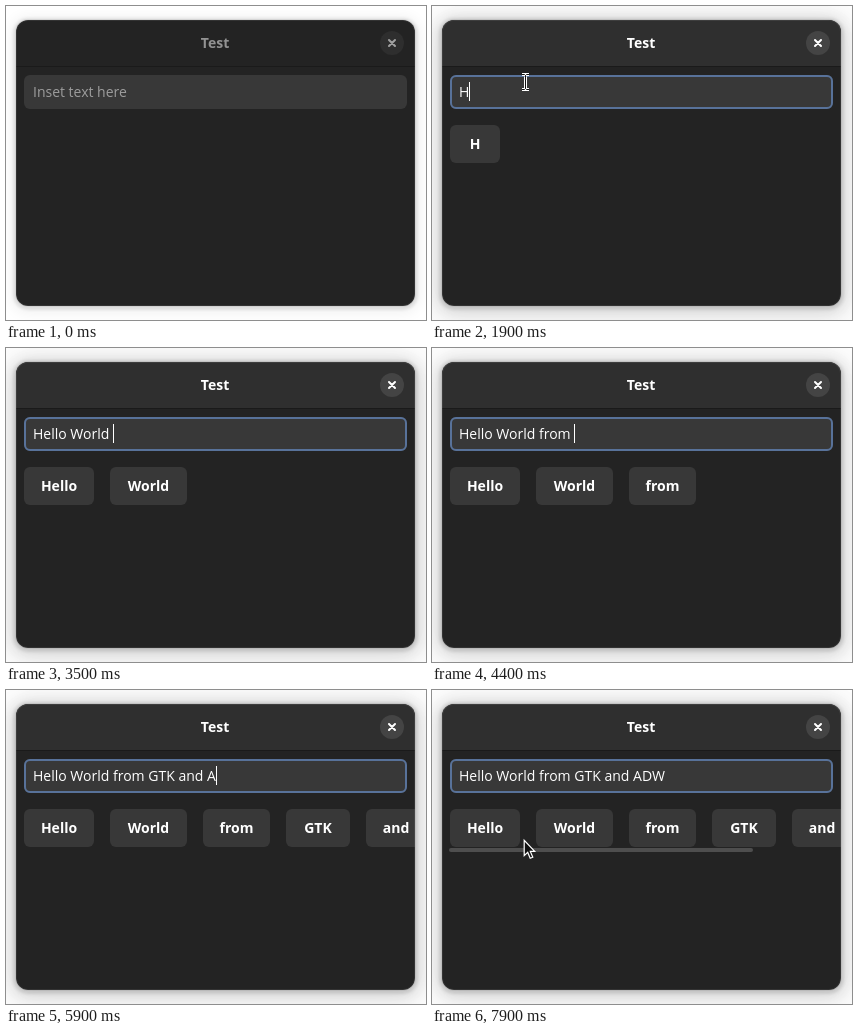
Animation, 420 px wide and 314 px high, one loop 8000 ms. Source, as an HTML page:

```html
<!DOCTYPE html>
<html lang="en">
<head>
<meta charset="utf-8">
<title>Test</title>
<style>
  html, body { margin: 0; width: 100%; height: 100%; overflow: hidden; background: #fff; }
  body { position: relative; font: 14px "Open Sans", "Noto Sans", sans-serif; color: #fff; }
  #stage { position: absolute; left: 0; top: 0; width: 420px; height: 314px; overflow: hidden; }
  #stage * { box-sizing: border-box; }
  #shade, #win, #edge, #head, #title, #close, #entry, #hint, #typed, #ring, #caret, #chips, #bar, #beam, #arrow {
    position: absolute; left: 0; top: 0;
  }
  #shade, #win, #edge { left: 10px; top: 14px; width: 399px; height: 286px; border-radius: 12px; }
  #shade {
    box-shadow: 0 1px 3px 3px rgba(0,0,0,.09), 0 2px 14px 5px rgba(0,0,0,.06),
      0 0 0 1px rgba(0,0,0,.05);
  }
  .active #shade {
    box-shadow: 0 1px 3px 3px rgba(0,0,0,.1), 0 2px 14px 5px rgba(0,0,0,.09),
      0 4px 28px 12px rgba(0,0,0,.05), 0 6px 40px 16px rgba(0,0,0,.03), 0 0 0 1px rgba(0,0,0,.05);
  }
  #win { background: #232323; overflow: hidden; }
  #edge { box-shadow: inset 0 0 0 1px rgba(255,255,255,.07); }
  #head { width: 399px; height: 46px; box-shadow: 0 1px rgba(0,0,0,.25); }
  .active #head { background: #2f2f2f; }
  #title { width: 398px; line-height: 46px; text-align: center; font-weight: 700; color: #929292; }
  #close { left: 364px; top: 11px; width: 24px; height: 24px; border-radius: 50%; background: #2e2e2e; }
  #close path { stroke: #a0a0a0; stroke-width: 2; stroke-linecap: round; }
  .active #title { color: #fff; }
  .active #close { background: #444; }
  .active #close path { stroke: #fff; }
  #entry { left: 8px; top: 55px; width: 383px; height: 34px; border-radius: 6px; background: #383838; line-height: 34px; }
  #hint, #typed { left: 9px; white-space: pre; }
  #hint { color: #9d9d9d; }
  #ring { border: 2px solid #58729a; border-radius: 6px; }
  #caret { top: 7px; width: 1px; height: 19px; background: #fff; }
  #chips { left: 8px; top: 105px; display: flex; gap: 16px; }
  .chip {
    flex: none; height: 38px; min-width: 50px; padding: 0 17px; border-radius: 6px; background: #383838;
    font-weight: 700; line-height: 38px; display: flex; justify-content: center;
  }
  #bar { left: 7px; top: 144px; width: 304px; height: 4px; border-radius: 2px; background: #4e4e4e; }
  #beam, #arrow { overflow: visible; }
  #beam path { fill: none; stroke: #111; }
  #beam path:first-child { stroke: #fff; stroke-width: 3; }
</style>
</head>
<body>
<div id="stage">
  <div id="shade"></div>
  <div id="win">
    <div id="head">
      <div id="title">Test</div>
      <div id="close"><svg width="24" height="24"><path d="M9 9l6 6M15 9l-6 6"/></svg></div>
    </div>
    <div id="entry">
      <span id="hint">Inset text here</span><span id="typed"></span>
      <div id="ring"></div><div id="caret"></div>
    </div>
    <div id="chips"></div>
    <div id="bar"></div>
  </div>
  <div id="edge"></div>
  <svg id="beam" width="10" height="18"></svg>
  <svg id="arrow" width="12" height="20">
    <path d="M.7.8V16.2L4.2 12.9L6.7 18.8L9.3 17.7L6.8 11.9H11.2Z" fill="#111" stroke="#fff" stroke-width="1.2"/>
  </svg>
</div>
<script>
const LOOP = 8000, TICK = 100, FOCUS = 900, TYPE = 1900;
const $ = id => document.getElementById(id);

// bursts of typing, one key per tick
const bursts = [
  [TYPE, 'H'], [2100, 'ello '], [2800, 'Wor'], [3300, 'ld fro'], [4100, 'm '],
  [4600, 'GTK '], [5100, 'and '], [5900, 'A'], [6100, 'DW']
];
const keys = bursts.flatMap(([at, text]) => [...text].map((char, i) => ({ char, at: at + i * TICK })));
const words = keys.map(k => k.char).join('').split(' ');
const widths = [70, 77, 67, 64, 60, 68];

const chips = words.map(() => {
  const chip = document.createElement('div');
  chip.className = 'chip';
  return $('chips').appendChild(chip);
});

const beamShape = '<path d="M-3.5-7.5H-1L0-6.5L1-7.5H3.5M0-6.5V6.5M-3.5 7.5H-1L0 6.5L1 7.5H3.5"/>';
$('beam').innerHTML = beamShape + beamShape;

const ramp = (t, a, b) => Math.min(1, Math.max(0, (t - a) / (b - a)));
const mix = (a, b, k) => a + (b - a) * k;
const easeOut = k => 1 - (1 - k) ** 2;
const show = (el, on) => { el.style.display = on ? '' : 'none'; };

// steady after a key, then a soft blink
function caretAlpha(t, lastKey) {
  if (t < FOCUS) return 0;
  const since = t - lastKey - 200;
  if (since < 0) return 1;
  const phase = since % 1200;
  return phase < 500 ? 1 - ramp(phase, 0, 300) : ramp(phase, 500, 800);
}

function drawText(t) {
  const done = keys.filter(k => k.at <= t);
  const text = done.map(k => k.char).join('');
  const parts = text.split(' ');
  $('typed').textContent = text;
  show($('hint'), !text);
  chips.forEach((chip, i) => {
    const part = parts[i] || '';
    chip.textContent = part;
    chip.style.width = part === words[i] ? widths[i] + 'px' : '';
    show(chip, part);
  });
  const caret = $('caret').style;
  caret.left = 9 + Math.round($('typed').getBoundingClientRect().width) + 'px';
  caret.opacity = caretAlpha(t, text ? done[done.length - 1].at : FOCUS);
}

function drawRing(t) {
  const k = easeOut(ramp(t, FOCUS, 1200));
  const ring = $('ring').style;
  ring.inset = mix(-4, 0, k) + 'px';
  ring.opacity = k;
}

function pointer(t) {
  if (t >= 400 && t < 2100) {
    const k = easeOut(ramp(t, 400, 700));
    return { x: mix(1, 93.5, k), y: mix(95, 76, k), beam: t >= 500 };
  }
  if (t >= 6900) {
    const k = ramp(t, 6900, 7800), y = mix(86, 149.5, k * k * (3 - 2 * k));
    return { x: mix(94, 91.5, k), y, beam: y < 103 };
  }
  return null;
}

function drawPointer(t) {
  const p = pointer(t);
  show($('beam'), p && p.beam);
  show($('arrow'), p && !p.beam);
  if (p) $(p.beam ? 'beam' : 'arrow').style.transform = `translate(${p.x}px, ${p.y}px)`;
}

function draw(t) {
  $('stage').className = t >= FOCUS ? 'active' : '';
  drawText(t);
  drawRing(t);
  drawPointer(t);
  $('bar').style.opacity = ramp(t, 7700, 7900);
}

const start = performance.now();
function frame() {
  const t = (performance.now() - start) % LOOP;
  draw(Math.floor(t / TICK) * TICK);
  requestAnimationFrame(frame);
}
frame();
</script>
</body>
</html>
```
